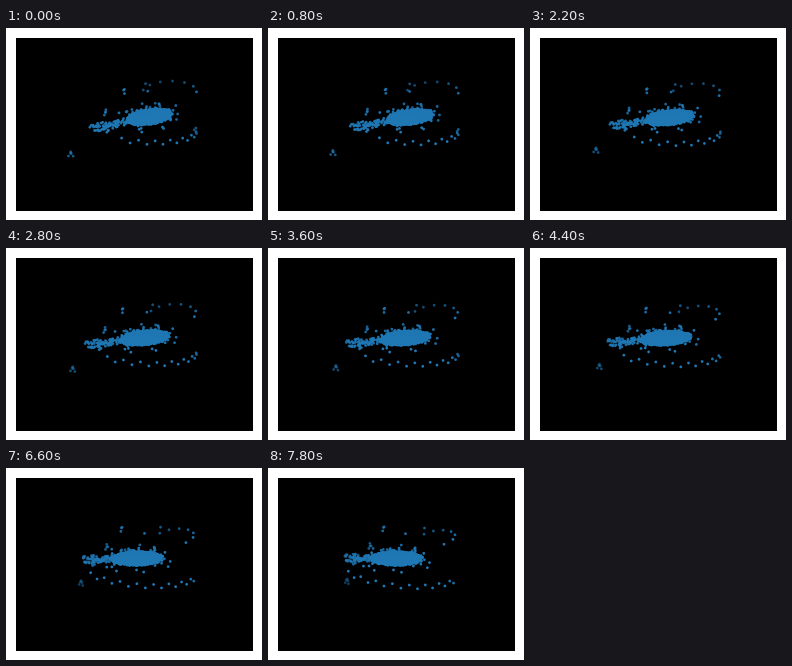
Animation of 256x192 px, one loop 8000 ms. Source, as a matplotlib script:

```python
import numpy as np
import matplotlib.pyplot as plt
from matplotlib.animation import FuncAnimation
from matplotlib.colors import to_rgba
from matplotlib.patches import Rectangle

W, H, DPI = 256, 192, 100
FRAMES, STEP_MS = 40, 200
CX, CY = 128, 90        # rotation axis and mid height on screen
TILT = 0.32             # sine of the camera elevation
BLUE = "#1f77b4"

rng = np.random.default_rng(7)

# Every part returns rows of side, depth (towards the viewer) and level,
# as they stand at the end of the turn.


def ring(phi, radius, level):
    phi = np.radians(phi)
    return np.array([radius * np.cos(phi), radius * np.sin(phi), level])


def lower_arc(n=16):
    sway = 1.8 * (-1.0) ** np.arange(n)
    return ring(np.linspace(23, 141, n), 62, np.linspace(105, 92, n) + sway)


def upper_arc(n=7):
    u = np.linspace(0, 1, n)
    rest = (1 - u) ** 2
    return ring(-36 + 76 * u ** 1.4, 62 - 28 * rest, 63 + 9 * rest)


def clump(n, side, depth, level, spread=0.0):
    mid = np.array([[side], [depth], [level]])
    return mid + spread * rng.uniform(-1, 1, (3, n))


def disc(n=1500):
    v = rng.normal(size=(3, n))
    x, d, h = v / np.linalg.norm(v, axis=0) * rng.random(n) ** 0.28
    return np.array([27 * x, 24 + 16 * d, 82.3 + 5 * h])


def halo(n=120):
    x, d, h = rng.normal(size=(3, n)).clip(-2.2, 2.2)
    return np.array([15 * x, 24 + 11 * d, 82.3 + 3.5 * h])


def tail(n=80):
    u = rng.random(n) ** 1.2
    x, d, h = rng.normal(size=(3, n)).clip(-2, 2)
    depth = 15 - 18 * u
    return np.array([-22 - 30 * u + x, depth + 5 * d,
                     CY - TILT * depth + 1.8 * h])


points = np.hstack([
    disc(), halo(), tail(), lower_arc(), upper_arc(),
    clump(5, -50, -41, 125, 3),
    clump(4, -27, -16, 81, 3.5),
    clump(3, -13.5, 0, 60.5, 2),
    clump(3, 17, 16, 76, 2),
    clump(1, 5, 40, 91),
    clump(1, 9, 10, 62),
    clump(1, 28, -17, 65),
])

fig = plt.figure(figsize=(W / DPI, H / DPI), dpi=DPI, facecolor="white")
ax = fig.add_axes([0, 0, 1, 1])
ax.set(xlim=(0, W), ylim=(H, 0))
ax.axis("off")
ax.add_patch(Rectangle((10, 10), 237, 173, color="black", lw=0))
dots = ax.scatter(*np.zeros((2, points.shape[1])), s=4, linewidths=0, zorder=2)
colors = np.tile(to_rgba(BLUE), (points.shape[1], 1))


def update(i):
    side, depth, level = points
    a = np.radians(FRAMES - 1 - i)      # one degree per step
    x = CX + side * np.cos(a) + depth * np.sin(a)
    near = depth * np.cos(a) - side * np.sin(a)
    dots.set_offsets(np.column_stack([x, level + TILT * near]) + 0.5)
    # parts further from the viewer are fainter
    colors[:, 3] = np.clip(0.8 + (near - TILT * (level - CY)) / 160, 0.4, 1)
    dots.set_facecolors(colors)
    return (dots,)


anim = FuncAnimation(fig, update, frames=FRAMES, interval=STEP_MS,
                     init_func=lambda: update(0), repeat=True, repeat_delay=0)
plt.show()
```
